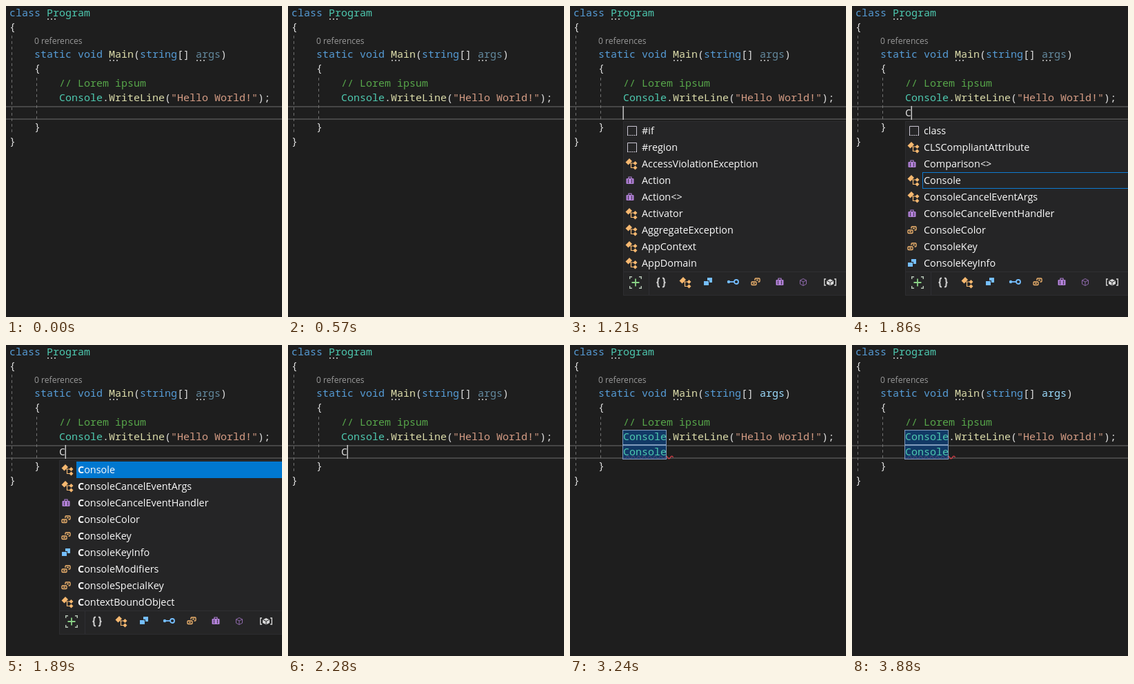
An HTML page for the animation above (4140 ms loop, 400 by 451 pixels).

```html
<!DOCTYPE html>
<html lang="en">
<head>
<meta charset="utf-8">
<title>Code completion</title>
<style>
html, body { margin: 0; width: 100%; height: 100%; overflow: hidden; background: #1e1e1e; }
svg { display: block; }
text { white-space: pre; }
.code { font: 15px "Noto Sans Mono", "DejaVu Sans Mono", monospace; fill: #dcdcdc; }
.lens { font: 12.1px "Open Sans", "Noto Sans", sans-serif; fill: #999; }
.list { font: 14.4px "Open Sans", "Noto Sans", sans-serif; fill: #fafafa; }
.kw { fill: #569cd6; }
.type { fill: #4ec9b0; }
.fn { fill: #dcdcaa; }
.str { fill: #d69d85; }
.note { fill: #57a64a; }
.guide { stroke: #717171; stroke-dasharray: 4 4; }
.dots { fill: #a3a3a3; }
.caret { fill: #dcdcdc; }
.mark { fill: #0e4583; fill-opacity: .72; stroke: #7f9abb; }

/* Every state switches hard inside one 4140 ms loop */
.t { visibility: hidden; animation: 4140ms step-end infinite; }
.caret1 { animation-name: caret1; }
.caret2, .typed { animation-name: typed; }
.caret3 { animation-name: caret3; }
.popup { animation-name: popup; }
.all { animation-name: all; }
.near { animation-name: near; }
.exact { animation-name: exact; }
.plain { animation-name: plain; }
.colored { animation-name: colored; }
.unused { animation-name: unused; }
.used { animation-name: used; }
.error { animation-name: error; }
.refs { animation-name: refs; }
@keyframes caret1 {
  0%, 13.76%, 40.09%, 100% { visibility: hidden; }
  1.69%, 27.53% { visibility: visible; }
}
@keyframes caret3 {
  0%, 67.87%, 93.71%, 100% { visibility: hidden; }
  55.79%, 80.67% { visibility: visible; }
}
@keyframes typed { 0%, 55.79%, 100% { visibility: hidden; } 44.92% { visibility: visible; } }
@keyframes popup { 0%, 55.07%, 100% { visibility: hidden; } 27.53% { visibility: visible; } }
@keyframes all { 0%, 44.92%, 100% { visibility: hidden; } 27.53% { visibility: visible; } }
@keyframes near { 0%, 45.65%, 100% { visibility: hidden; } 44.92% { visibility: visible; } }
@keyframes exact { 0%, 55.07%, 100% { visibility: hidden; } 45.65% { visibility: visible; } }
@keyframes plain { 0%, 66.18%, 100% { visibility: hidden; } 55.79% { visibility: visible; } }
@keyframes colored { 0% { visibility: hidden; } 66.18%, 100% { visibility: visible; } }
@keyframes unused { 0% { visibility: visible; } 58.93%, 100% { visibility: hidden; } }
@keyframes used { 0% { visibility: hidden; } 58.93%, 100% { visibility: visible; } }
@keyframes error { 0% { visibility: hidden; } 69.56%, 100% { visibility: visible; } }
@keyframes refs { 0% { visibility: hidden; } 78.26%, 100% { visibility: visible; } }
</style>
</head>
<body>
<svg width="400" height="451" viewBox="0 0 400 451">
  <defs>
    <g id="snip" fill="none" stroke="#c8c4d0">
      <path d="M-5.5 6V-6.5H7.5V6"/>
      <path d="M-6 6.5H8" stroke-dasharray="2 1"/>
    </g>
    <g id="class" fill="#f6b870">
      <path d="M-3-8L1-4L-4.5 1.5L-8.5-2.5ZM5.5-4L8.5-1L5.5 2L2.5-1ZM5.5 2.5L8.5 5.5L5.5 8.5L2.5 5.5Z"/>
      <path d="M-2-1H4M-.5-1V5.5H4" fill="none" stroke="#f6b870" stroke-width="1.2"/>
    </g>
    <g id="delegate" fill="#b180d7">
      <rect x="-5.5" y="-3" width="11" height="8" rx="1"/>
      <path d="M-2-3V-5H2V-3" fill="none" stroke="#b180d7" stroke-width="1.2"/>
      <path d="M-2.5-2V4M2.5-2V4" stroke="#252526" stroke-width=".8"/>
    </g>
    <g id="enum" fill="none" stroke="#f6b870" stroke-width="1.3">
      <path d="M-1-2V-4Q-1-5 0-5H5Q6-5 6-4V-1Q6 0 5 0H3.5M1-2.5H4"/>
      <rect x="-6" y="0" width="7" height="4.5" rx="1"/>
      <path d="M-4 2.2H-1"/>
    </g>
    <g id="struct" fill="#75beff">
      <path d="M-1-6H6V1H2V-2H-1ZM-6-1H1V5H-6Z"/>
    </g>
    <g id="iface" fill="none" stroke="#75beff" stroke-width="1.8">
      <circle cx="5" r="3"/>
      <path d="M-4 0H2"/>
      <circle cx="-6" r="2.2" fill="#75beff" stroke="none"/>
    </g>
    <g id="cube" fill="none">
      <path d="M0-5L4.5-2.7V2.7L0 5L-4.5 2.7V-2.7ZM-4.5-2.7L0-.5L4.5-2.7M0-.5V5"/>
    </g>
  </defs>

  <path fill="#464646" d="M0 145H400v2H0ZM0 163H400v2H0Z"/>
  <path class="guide" d="M8.5 43V185M44.5 104V165"/>

  <path id="wave" class="t error" fill="none" stroke="#e5404a" stroke-width="1.2"/>
  <g class="t refs mark">
    <rect x="76.5" y="123.5" width="63" height="21"/>
    <rect x="76.5" y="145.5" width="63" height="20"/>
  </g>

  <g class="code">
    <text x="5" y="15"><tspan class="kw">class</tspan> <tspan class="type">Program</tspan></text>
    <text x="5" y="35">{</text>
    <text class="lens" x="41" y="55">0 references</text>
    <text x="41" y="75"><tspan class="kw">static void</tspan> <tspan class="fn">Main</tspan>(<tspan class="kw">string</tspan>[]</text>
    <text class="t unused" x="275" y="75" fill="#648ba0">args</text>
    <text class="t used" x="275" y="75" fill="#9cdcfe">args</text>
    <text x="311" y="75">)</text>
    <text x="41" y="95">{</text>
    <text class="note" x="77" y="117">// Lorem ipsum</text>
    <text x="77" y="138"><tspan class="type">Console</tspan>.<tspan class="fn">WriteLine</tspan>(<tspan class="str">"Hello World!"</tspan>);</text>
    <text class="t typed" x="77" y="160">C</text>
    <text class="t plain" x="77" y="160">Console</text>
    <text class="t colored type" x="77" y="160">Console</text>
    <text x="41" y="180">}</text>
    <text x="5" y="201">}</text>
  </g>

  <g class="dots">
    <path d="M60 18h2v2h-2ZM65 18h2v2h-2ZM70 18h2v2h-2Z"/>
    <path d="M150 78h2v2h-2ZM155 78h2v2h-2ZM160 78h2v2h-2Z"/>
    <path class="t unused" d="M276 78h2v2h-2ZM281 78h2v2h-2ZM286 78h2v2h-2Z"/>
  </g>

  <g class="caret">
    <rect class="t caret1" x="76.5" y="145" width="1.3" height="20"/>
    <rect class="t caret2" x="85.6" y="145" width="1.3" height="20"/>
    <rect class="t caret3" x="139.5" y="145" width="1.3" height="20"/>
  </g>

  <g class="t popup">
    <rect x="77.5" y="167.5" width="330" height="252" fill="#252526" stroke="#2d2d30"/>
    <path d="M78 385.5H400M114.5 386V419" stroke="#2f2f33"/>
    <g fill="none" stroke="#d0d0d0" stroke-width="1.4">
      <path d="M90 392.7H86.7V396M100 392.7H103.3V396M86.7 406V409.3H90M103.3 406V409.3H100" stroke="#b5c4b5"/>
      <path d="M95 395.5V406.5M89.5 401H100.5" stroke="#89d185" stroke-width="1.8"/>
      <path d="M130 394.5q-2.5 0-2.5 2.5v2q0 2-2 2q2 0 2 2v2q0 2.5 2.5 2.5M134 394.5q2.5 0 2.5 2.5v2q0 2 2 2q-2 0-2 2v2q0 2.5-2.5 2.5" stroke-width="2"/>
      <path d="M371 396H368.7V405H371M383 396H385.3V405H383"/>
    </g>
    <use href="#class" x="167" y="401"/>
    <use href="#struct" x="200" y="400"/>
    <use href="#iface" x="236" y="400"/>
    <use href="#enum" x="269" y="400"/>
    <use href="#delegate" x="304" y="400"/>
    <use href="#cube" x="338" y="400.5" stroke="#8d68aa"/>
    <path d="M377 396L382 398.5V403L377 405.5L372 403V398.5Z" fill="#d8d8d8"/>
    <path d="M372.5 398.5L377 400.5L381.5 398.5M377 400.5V405.5" fill="none" stroke="#252526"/>
  </g>
  <g id="all" class="t all list"></g>
  <g id="near" class="t near list">
    <rect x="102.5" y="241.5" width="300" height="23" fill="none" stroke="#0e7ad1"/>
  </g>
  <g id="exact" class="t exact list">
    <rect x="102" y="169" width="298" height="24" fill="#0078d0"/>
  </g>
</svg>
<script>
const icons = { s: "snip", c: "class", d: "delegate", e: "enum", v: "struct" };

// Each item is an icon key, a colon and its label
function fill(id, items, bold) {
  const rows = items.split(" ").map((item, i) => {
    const [key, name] = item.split(":");
    const x = "sc".includes(key) ? 89 : 87;
    const y = 181 + i * 24;
    const label = name.replace(/</g, "&lt;");
    const body = bold ? `<tspan font-weight="700">${label[0]}</tspan>${label.slice(1)}` : label;
    return `<use href="#${icons[key]}" x="${x}" y="${y}"/><text x="104" y="${y + 5}">${body}</text>`;
  });
  document.getElementById(id).insertAdjacentHTML("beforeend", rows.join(""));
}

fill("all", "s:#if s:#region c:AccessViolationException d:Action d:Action<> c:Activator c:AggregateException c:AppContext c:AppDomain");
fill("near", "s:class c:CLSCompliantAttribute d:Comparison<> c:Console c:ConsoleCancelEventArgs d:ConsoleCancelEventHandler e:ConsoleColor e:ConsoleKey v:ConsoleKeyInfo");
fill("exact", "c:Console c:ConsoleCancelEventArgs d:ConsoleCancelEventHandler e:ConsoleColor e:ConsoleKey v:ConsoleKeyInfo e:ConsoleModifiers e:ConsoleSpecialKey c:ContextBoundObject", true);

document.getElementById("wave").setAttribute("d", "M77.5 163q2 4 4 0" + "t4 0".repeat(17));
</script>
</body>
</html>
```
